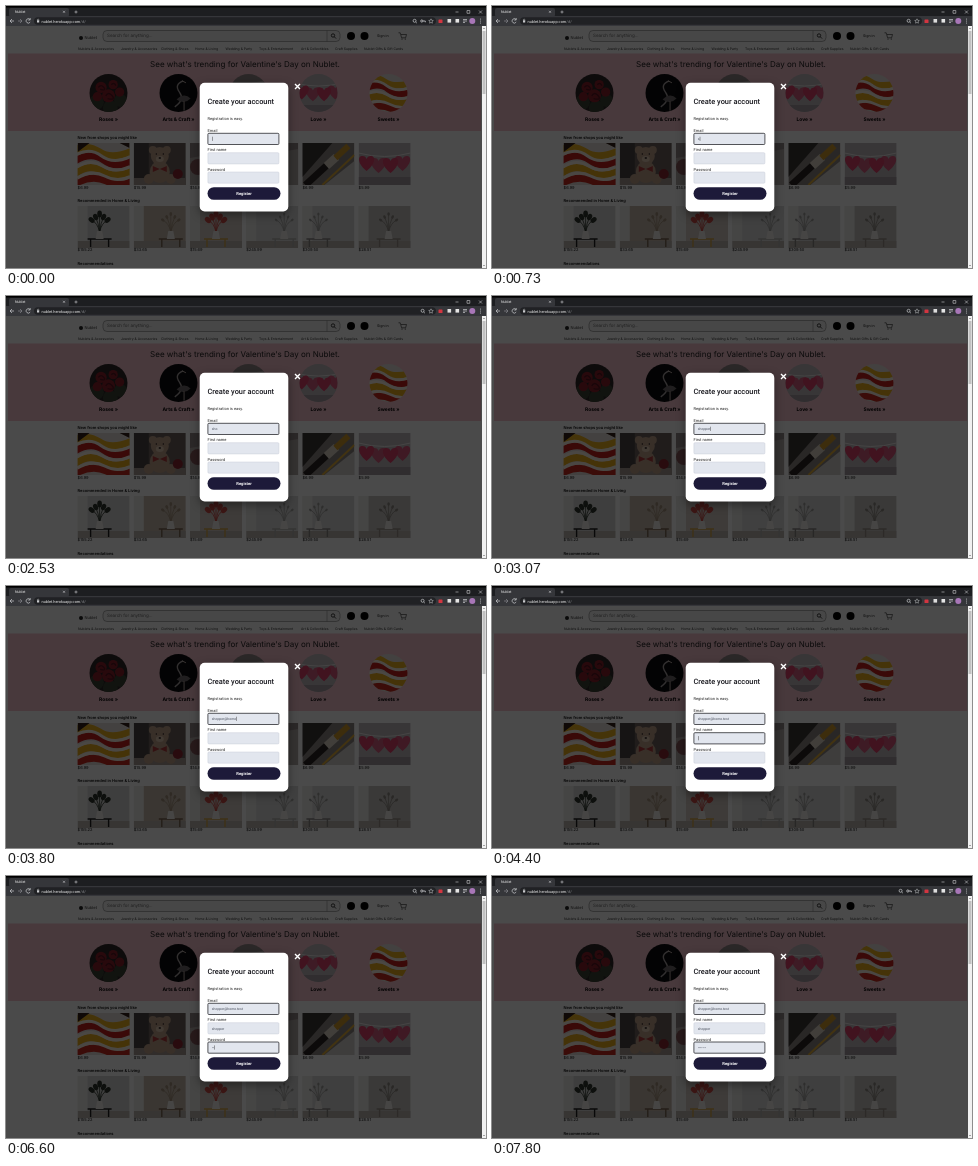
These frames come from a looping animation (480 px wide and 262 px high, 8 s). An HTML page:

```html
<!DOCTYPE html>
<html lang="en">
<head>
<meta charset="utf-8">
<title>Nublet</title>
<style>
  html, body { margin: 0; width: 100%; height: 100%; overflow: hidden; background: #4a4a4a; }
  #stage { display: block; width: 100vw; height: 100vh; }
  text { font-family: Inter, "Open Sans", sans-serif; white-space: pre; text-rendering: geometricPrecision; }
  .ui { font-family: Roboto, Inter, sans-serif; }
  #card { filter: drop-shadow(0 3px 5px rgba(0, 0, 0, .4)); }
</style>
</head>
<body>
<svg id="stage" viewBox="0 0 480 262" preserveAspectRatio="none">
  <defs>
    <symbol id="candy" viewBox="0 0 52 42" preserveAspectRatio="xMidYMid slice">
      <rect width="52" height="42" fill="#e9e2dc"/>
      <g fill="none" stroke-width="7">
        <path d="M-3 7Q10 1 22 9T55 8" stroke="#f0b41e"/>
        <path d="M-3 18Q14 8 26 17T55 18" stroke="#c9201c"/>
        <path d="M-3 31Q12 20 24 28T55 28" stroke="#f0b01c"/>
        <path d="M-3 41Q14 31 29 38T55 38" stroke="#cd2a20"/>
      </g>
      <path d="M-2 12Q12 4 24 13T54 13M-2 25Q12 15 25 23T54 23M-2 36Q14 26 27 33T54 33" fill="none" stroke="#fff7e8" stroke-width="3"/>
      <path d="M0 0h12L0 9zM42 0h10v5z" fill="#332019"/>
    </symbol>
    <symbol id="hearts" viewBox="0 0 52 42" preserveAspectRatio="xMidYMid slice">
      <rect width="52" height="42" fill="#c0babd"/>
      <path d="M0 10Q26 17 52 10" fill="none" stroke="#f0ecec" stroke-width="1"/>
      <path id="heart" d="M8 28C-3 19 0 12 4 13Q7 13 8 16Q9 13 12 13C16 12 19 19 8 28Z" fill="#e0406b"/>
      <use href="#heart" x="12" y="2" opacity=".75"/>
      <use href="#heart" x="24" y="2"/>
      <use href="#heart" x="36" opacity=".8"/>
      <path d="M0 34h52v8H0z" fill="#a59da3"/>
    </symbol>
    <symbol id="roses" viewBox="0 0 52 42" preserveAspectRatio="xMidYMid slice">
      <rect width="52" height="42" fill="#2c2525"/>
      <g fill="#3b4234"><circle cx="13" cy="31" r="8"/><circle cx="39" cy="29" r="7"/><circle cx="28" cy="37" r="8"/></g>
      <g fill="#8c1f2a"><circle cx="18" cy="15" r="6"/><circle cx="31" cy="12" r="5"/><circle cx="26" cy="24" r="7"/><circle cx="38" cy="20" r="5"/><circle cx="14" cy="25" r="5"/></g>
      <path d="M15 15q3-4 6 0t-4 2M23 24q3-5 7 0t-5 3M29 12q3-3 5 1" fill="none" stroke="#561520" stroke-width="1.5"/>
    </symbol>
    <symbol id="craft" viewBox="0 0 52 42" preserveAspectRatio="xMidYMid slice">
      <rect width="52" height="42" fill="#0c0c0d"/>
      <path d="M22 36Q33 28 27 20T31 8" fill="none" stroke="#aaa2a3" stroke-width="1.5"/>
      <path d="M24 28q8-8 15-1q-7 7-15 1z" fill="#6f696b"/>
      <path d="M32 30v10M30 8l4 2" stroke="#cdbbb5" fill="none"/>
    </symbol>
    <symbol id="bear" viewBox="0 0 52 42" preserveAspectRatio="xMidYMid slice">
      <rect width="52" height="42" fill="#6f625d"/>
      <path d="M0 0h15v42H0z" fill="#4c4644"/><path d="M0 35h52v7H0z" fill="#a89a94"/>
      <g fill="#c0a28c"><circle cx="19" cy="7" r="4"/><circle cx="33" cy="7" r="4"/><circle cx="26" cy="13" r="9"/><ellipse cx="26" cy="29" rx="10" ry="11"/><circle cx="15" cy="36" r="5"/><circle cx="37" cy="36" r="5"/></g>
      <ellipse cx="26" cy="16" rx="4" ry="3" fill="#e0c7b2"/>
      <path d="M22 11h1M29 11h1M25 15h2" stroke="#251c19" stroke-width="1.5"/>
      <path d="M19 23l7 3 7-3v6l-7-3-7 3z" fill="#b23b3c"/>
      <circle cx="44" cy="31" r="5" fill="#8f2630"/>
    </symbol>
    <symbol id="brushes" viewBox="0 0 52 42" preserveAspectRatio="xMidYMid slice">
      <rect width="52" height="42" fill="#8f8884"/>
      <path d="M0 0h30L0 34z" fill="#3c3735"/>
      <path d="M52 18v24H22z" fill="#d8d3ce"/>
      <g fill="none"><path d="M3 42L27 20" stroke="#2b2421" stroke-width="7"/><path d="M24 23L34 14" stroke="#e0d8ca" stroke-width="8"/><path d="M33 15L46 3" stroke="#d49a2a" stroke-width="6"/><path d="M20 42L52 12" stroke="#e4b03a" stroke-width="2"/></g>
    </symbol>
    <symbol id="plain" viewBox="0 0 52 42" preserveAspectRatio="xMidYMid slice">
      <rect width="52" height="42" fill="#96898a"/><path d="M0 15L52 6v36H0z" fill="#b5acab"/><circle cx="8" cy="24" r="8" fill="#86585a"/>
    </symbol>
  </defs>
  <g id="page"></g>
  <rect y="20" width="476" height="242" opacity=".71"/>
  <g id="browser"></g>
  <g id="modal"></g>
</svg>
<script>
const LOOP = 8000;
const SITE = "Nublet";
const byId = id => document.getElementById(id);
const rect = (x, y, w, h, fill, more = "") => `<rect x="${x}" y="${y}" width="${w}" height="${h}" fill="${fill}" ${more}/>`;
const circle = (x, y, r, fill, more = "") => `<circle cx="${x}" cy="${y}" r="${r}" fill="${fill}" ${more}/>`;
const path = (d, color, width = .7) => `<path d="${d}" fill="none" stroke="${color}" stroke-width="${width}"/>`;
const label = (x, y, size, words, fill = "#111", more = "") =>
  `<text x="${x}" y="${y}" font-size="${size}" fill="${fill}" ${more}>${words.replace(/&/g, "&amp;")}</text>`;
const photo = (id, x, y, w, h) => `<use href="#${id}" x="${x}" y="${y}" width="${w}" height="${h}"/>`;
const MID = 'text-anchor="middle"';
const BOLD = 'font-weight="700"';

// A room scene: a plant in a vase, with its own wall, leaf and furniture colours.
const ROOMS = [
  { wall: "#d8d8d6", leaf: "#2d352c", wood: "#1f1f1f", at: 22, size: 3.4 },
  { wall: "#c9bcae", leaf: "#a4917c", wood: "#7b6552", at: 37, size: 2 },
  { wall: "#d6cbc6", leaf: "#cf4b46", wood: "#d9a94a", at: 26, size: 3.6 },
  { wall: "#dedede", leaf: "#a5a5a3", wood: "#b5b3b1", at: 38, size: 1.6 },
  { wall: "#dadada", leaf: "#a09f9d", wood: "#8b8785", at: 16, size: 1.6 },
  { wall: "#c8c5c2", leaf: "#8f8983", wood: "#9a928a", at: 30, size: 1.8 }
];
function room({ wall, leaf, wood, at, size }, x, y) {
  let s = rect(0, 0, 52, 42, wall) + rect(0, 0, 10, 36, "#efeeec") + rect(0, 35, 52, 7, "#bdb7b1");
  for (let i = -2; i <= 2; i++) {
    const tx = at + i * 4, ty = 8 + Math.abs(i) * 3;
    s += path(`M${at} 26Q${at + i} 17 ${tx} ${ty}`, leaf, .8);
    s += `<ellipse cx="${tx}" cy="${ty}" rx="${size * .7}" ry="${size}" fill="${leaf}" transform="rotate(${i * 25} ${tx} ${ty})"/>`;
  }
  s += path(`M${at - 12} 33h24M${at - 9} 33v8M${at + 9} 33v8`, wood, 1.4);
  s += `<path d="M${at - 2.5} 25h5l1.5 8h-8z" fill="#f3f0ec"/>`;
  return `<svg x="${x}" y="${y}" width="52" height="42" viewBox="0 0 52 42">${s}</svg>`;
}

function drawPage() {
  let s = rect(0, 20, 476, 242, "#fff") + rect(2, 47.5, 473, 77.5, "#f8c4cf");
  s += circle(75, 32, 2, "#222") + label(78.5, 32.7, 4, SITE, "#333");
  s += rect(97, 24.5, 237, 11, "#f7f7f7", 'rx="4" stroke="#666" stroke-width=".5"') + path("M321 24.5v11", "#777", .5);
  s += label(101, 31.4, 4.5, "Search for anything...", "#666");
  s += circle(327, 29.5, 1.7, "none", 'stroke="#111" stroke-width=".8"') + path("M328.3 30.8l1.8 1.8", "#111", .8);
  s += circle(345, 30, 4, "#000") + circle(358.5, 30, 4, "#000") + label(371, 31.2, 3.6, "Sign in");
  s += path("M392.5 26.8h1.7l1.4 5h4l.9-3.3h-5.5", "#222", .6) + circle(396, 33, .6, "#222") + circle(399.3, 33, .6, "#222");

  const menu = [[72, SITE + "s & Accessories"], [115, "Jewelry & Accessories"], [155, "Clothing & Shoes"],
    [189, "Home & Living"], [219.5, "Wedding & Party"], [253, "Toys & Entertainment"],
    [295, "Art & Collectibles"], [329, "Craft Supplies"], [358, SITE + " Gifts & Gift Cards"]];
  s += menu.map(([x, t]) => label(x, 44.2, 3.4, t, "#333")).join("");
  s += label(239, 61, 8, `See what's trending for Valentine's Day on ${SITE}.`, "#222", MID);

  [["roses", "Roses"], ["craft", "Arts & Craft"], ["plain", "Gifts"], ["hearts", "Love"], ["candy", "Sweets"]]
    .forEach(([id, name], i) => {
      const x = 102.5 + i * 70;
      s += `<clipPath id="round${i}">${circle(x, 87, 19)}</clipPath>`;
      s += `<g clip-path="url(#round${i})">${photo(id, x - 24, 67.5, 48, 39)}</g>`;
      s += label(x, 115, 4.9, name + " »", "#000", `${MID} ${BOLD}`);
    });

  const heading = (y, words) => label(71.5, y, 4, words, "#111", 'font-weight="600"');
  s += heading(133, "New from shops you might like") + heading(195.8, "Recommended in Home & Living") + heading(259, "Recommendations");
  const shops = ["candy", "bear", "plain", "plain", "brushes", "hearts"];
  const prices = ["$6.99", "$15.99", "$14.99", "$9.99", "$6.99", "$5.99"];
  const homePrices = ["$155.22", "$33.65", "$15.69", "$245.99", "$309.50", "$28.51"];
  shops.forEach((id, i) => {
    const x = 71.6 + i * 56.2;
    s += photo(id, x, 137, 52, 42) + label(x, 182.8, 4, prices[i]);
    s += room(ROOMS[i], x, 200) + label(x, 245.3, 4, homePrices[i]);
  });
  byId("page").innerHTML = s;
}

function drawBrowser() {
  const pale = "#c9cacd";
  let s = rect(0, 0, 480, 10, "#1d1e21") + rect(0, 10, 480, 10, "#35363a");
  s += rect(3, 2, 60, 9, "#35363a", 'rx="2"') + rect(0, 0, 480, 1.5, "#000") + label(9, 7.4, 3.6, SITE, "#eee", 'class="ui"');
  s += path("M57 4.8l2 2m0-2l-2 2M68.5 6h3M70 4.5v3", pale, .6);
  s += path("M449.5 6h3M461 4.5h2.8v2.8H461zM473 4.5l3 3m0-3l-3 3", pale, .6);
  s += path("M8 15H4l2-2m-2 2l2 2", pale) + path("M12 15h4l-2-2m2 2l-2 2", "#84868a");
  s += path("M24 13.5a2.2 2.2 0 1 0 .2 2.5M24.2 12v2h-2", pale);
  s += rect(28, 11.3, 402, 7.5, "#202124", 'rx="3.7"');
  s += rect(31, 14.3, 2.2, 2.2, pale) + path("M31.4 14.5v-1q.7-1 1.4 0v1", pale, .5);
  s += label(35.5, 16.5, 3.9, `${SITE.toLowerCase()}.herokuapp.com<tspan fill="#85878b">/#/</tspan>`, "#eee", 'class="ui"');
  s += `<g id="zoom">${circle(416.6, 14.8, 1.5, "none", `stroke="${pale}" stroke-width=".7"`)}${path("M417.7 16l1.2 1.2", pale)}</g>`;
  s += `<g id="key">${circle(415.8, 15, 1.1, "none", `stroke="${pale}" stroke-width=".8"`)}${path("M417 15h2.3v1.3", pale, .8)}</g>`;
  s += path("M425 12.8l.7 1.5 1.6.2-1.2 1.1.3 1.6-1.4-.8-1.4.8.3-1.6-1.2-1.1 1.6-.2z", pale, .5);
  s += rect(432.5, 13.5, 4, 3.5, "#d33540", 'rx=".6"') + rect(441.5, 13, 3.6, 3.6, "#ddd") + rect(449.5, 13, 3.6, 3.6, "#e5e5e5");
  s += path("M457 13.5h4m-4 1.5h4m-4 1.5h2", pale) + circle(466.3, 15, 3, "#a876b8");
  s += [13, 15, 17].map(y => circle(474.5, y, .5, pale)).join("");
  s += rect(476, 20, 4, 242, "#f1f1f1") + rect(476.5, 25, 3, 63, "#c1c1c1");
  s += path("M477 23l1-1 1 1M477 259l1 1 1-1", "#555", .5);
  byId("browser").innerHTML = s;
}

const FIELDS = [["Email", 125.9, 127.3], ["First name", 145.2, 146.7], ["Password", 164.6, 166]];

function drawModal() {
  const ui = 'class="ui"';
  let s = rect(193.7, 76.7, 88.6, 128.8, "#fff", 'rx="5" id="card"');
  s += path("M289 78l5 5m0-5l-5 5", "#fff", 1.4);
  s += label(201.5, 98.4, 7.4, "Create your account", "#16161c", `${ui} font-weight="500"`);
  s += label(201.5, 114.2, 4, "Registration is easy.", "#222", ui);
  FIELDS.forEach(([name, base, top], i) => {
    s += label(201.5, base, 4, name, "#222", ui);
    s += rect(201.9, top, 71, 11.2, "#e2e6ee", `rx="1" id="box${i}"`);
    s += label(205.8, top + 6.8, 3.45, "", "#444a58", `${ui} id="value${i}"`);
    s += rect(0, top + 3.4, .45, 4.2, "#333", `id="caret${i}"`);
  });
  s += rect(201.5, 181.2, 73, 12.6, "#1d1a39", 'rx="6.3"');
  s += label(238, 189, 4.1, "Register", "#fff", `${ui} ${MID} font-weight="600"`);
  byId("modal").innerHTML = s;
}

// Each step is "time value"; a closing bar shows the caret.
const steps = list => list.split(",").map(step => {
  const [time, value = ""] = step.trim().split(" ");
  return [+time, value];
});
const typed = [
  steps("0 |, 600, 730 s|, 1070 sh|, 1270 sho|, 1470 shop|, 1600 shopp|, 1730 shop|, 2000 sho|, 2530 sho, " +
    "2600 shop|, 2730 shopp|, 2870 shoppe|, 3070 shopper|, 3270 shopper@|, 3400 shopper@h|, 3530 shopper@ho|, " +
    "3600 shopper@hom|, 3800 shopper@home|, 3930 shopper@home, 4070 shopper@home.|, 4130 shopper@home.t|, " +
    "4200 shopper@home.te|, 4270 shopper@home.tes|, 4330 shopper@home.test|, 4400 shopper@home.test"),
  steps("0, 4400 |, 4870 s|, 5000 sh|, 5130 sho|, 5200 shop|, 5400 shopp|, 5530 shoppe|, 5730 shopper|, 5870 shopper"),
  steps("0, 5870 |, 6270 •|, 6600 ••|, 6730 •••|, 6930 ••••|, 7070 ••••••|, 7270 •••••••|, 7800 •••••••")
];
const at = (table, t) => table.reduce((value, step) => step[0] <= t ? step[1] : value, "");

function render(t) {
  typed.forEach((table, i) => {
    const state = at(table, t), value = byId("value" + i), caret = byId("caret" + i);
    value.textContent = state.replace("|", "");
    const width = value.textContent ? value.getComputedTextLength() : 0;
    caret.setAttribute("x", 206 + width);
    caret.setAttribute("visibility", state.endsWith("|") ? "visible" : "hidden");
    const dark = i === 0 || (i === 1 && t >= 4400 && t < 5870) || (i === 2 && t >= 5870);
    byId("box" + i).setAttribute("stroke", dark ? "#2a2b30" : "#c9cdd8");
    byId("box" + i).setAttribute("stroke-width", dark ? .8 : .5);
  });
  const saved = t < 730 || t >= 6270;
  byId("key").setAttribute("visibility", saved ? "visible" : "hidden");
  byId("zoom").setAttribute("transform", `translate(${saved ? -8 : 0} 0)`);
}

drawPage();
drawBrowser();
drawModal();

const start = performance.now();
function tick() {
  render((performance.now() - start) % LOOP);
  requestAnimationFrame(tick);
}
tick();
</script>
</body>
</html>
```
